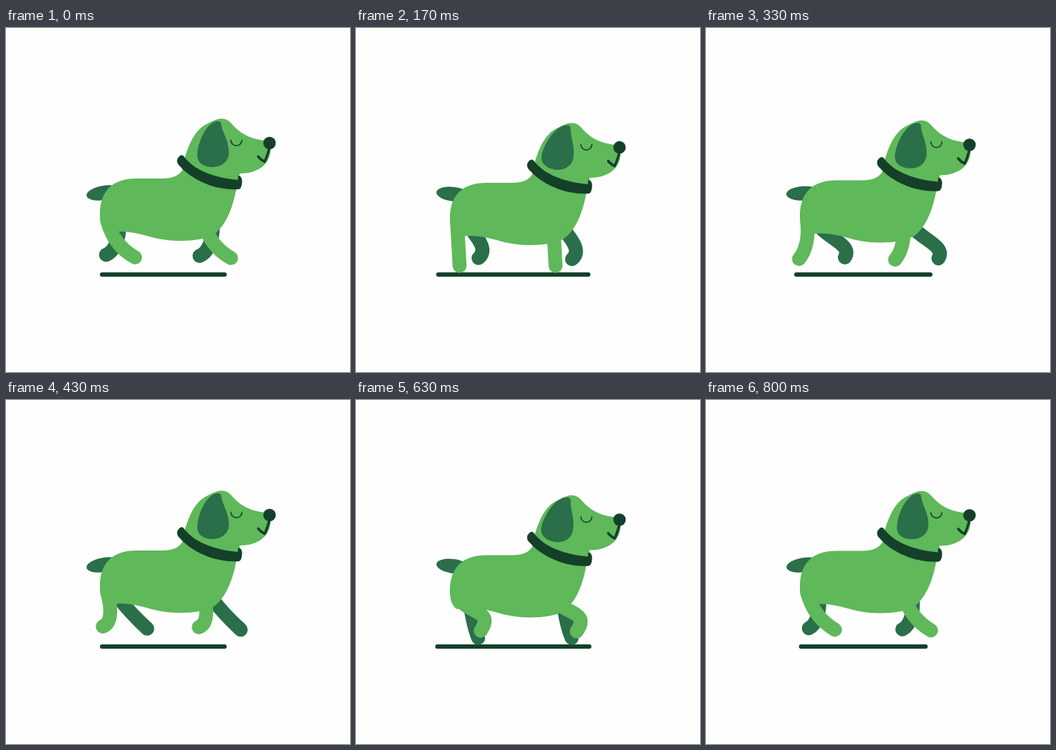
Write an HTML page with a canvas that moves like this. It is 480 px wide and 480 px high and loops after 0.83 s.

```html
<!DOCTYPE html>
<html lang="en">
<head>
<meta charset="utf-8">
<title>Walking dog</title>
<style>
  html, body { margin: 0; width: 100%; height: 100%; overflow: hidden; background: #fefefe; }
  canvas { display: block; width: 480px; height: 480px; }
</style>
</head>
<body>
<canvas id="stage"></canvas>
<script>
const LOOP = 830, STEPS = 25, STEP = 1000 / 30;
const LIGHT = '#5fb85a', SHADE = '#2a6e4a', DARK = '#14402a';

const canvas = document.getElementById('stage');
const ctx = canvas.getContext('2d');
const ratio = window.devicePixelRatio || 1;
canvas.width = canvas.height = 480 * ratio;

// Leg poses of a rear leg: two curve handles and the paw, at the steps in KEYS.
const KEYS = [0, 5, 8, 13, 16, 19, 24];
const NEAR = {
  hip: [141, 268], front: [134, 1], color: LIGHT,
  poses: [
    [147, 291, 160, 309, 180, 320],
    [142, 290, 143.5, 311, 144.5, 332],
    [141, 291, 138, 311, 131, 327],
    [149, 295, 146, 312, 135, 316],
    [145, 290, 178, 300, 160, 318],
    [146, 300, 196, 290, 174, 322],
    [147, 291, 160, 309, 180, 320.5]
  ]
};
const FAR = {
  hip: [158, 277], front: [130.5, 1.5], color: SHADE,
  poses: [
    [158, 293, 152, 312, 139.5, 316.5],
    [166, 290, 186, 308, 171, 321],
    [178, 298, 212, 304, 189, 321],
    [170, 293, 183, 306, 197, 319],
    [168, 299, 178, 321, 195, 323],
    [161, 300, 165, 318, 170.5, 332],
    [159, 294, 155, 313, 143.5, 318.5]
  ]
};

const HEAD = new Path2D(
  'M246 198C251 168 262 146 275 137C285 131 293 127 300 126.5C308 126 313 131 318 137' +
  'C330 150 346 156 364 157L369 168C370 184 358 203 326 203L324 218Z');
const BODY = new Path2D(
  'M250 192C243 205 236 210 216 210L185 210C150 209 131 226 131 260C131 272 134 280 140 285' +
  'L158 284C190 284 205 297 243 297C262 297 280 294 290 288C308 275 318 247 322 220Z');
const EAR = new Path2D(
  'M296 130C280 130 267 160 267 178C267 189 277 194 288 194C303 194 311 184 311 174' +
  'C311 156 301 145 300 133Q299 130 296 130Z');
const COLLAR = new Path2D(
  'M248.500 179.500C262 198 290 209 323.500 212L324 206Q329 206 329.500 214Q329 224 325 225' +
  'C298 227 262 216 240 190Q237 184 241 180Q245 175 248.500 179.500Z');
const MOUTH = new Path2D('M352 179.500Q356 184.500 361 186.500Q365 178 368 166');

const mod = (n, m) => ((n % m) + m) % m;

// Smooth periodic curve through the poses.
function poseAt(poses, step) {
  const n = KEYS.length;
  const time = i => KEYS[mod(i, n)] + STEPS * Math.floor(i / n);
  const value = (i, c) => poses[mod(i, n)][c];
  const slope = (i, c) => (value(i + 1, c) - value(i - 1, c)) / (time(i + 1) - time(i - 1));
  let k = n - 1;
  while (KEYS[k] > step) k--;
  const span = time(k + 1) - time(k);
  const u = (step - time(k)) / span, v = 1 - u;
  return poses[0].map((_, c) =>
    value(k, c) * (1 + 2 * u) * v * v + value(k + 1, c) * (3 - 2 * u) * u * u +
    span * u * v * (slope(k, c) * v - slope(k + 1, c) * u));
}

function stroke(color, width, path) {
  ctx.strokeStyle = color;
  ctx.lineWidth = width;
  path ? ctx.stroke(path) : ctx.stroke();
}

function fill(color, path) {
  ctx.fillStyle = color;
  path ? ctx.fill(path) : ctx.fill();
}

function drawLegs(legs, step) {
  const [ax, ay, bx, by, px, py] = poseAt(legs.poses, step);
  for (const [dx, dy] of [[0, 0], legs.front]) {
    ctx.beginPath();
    ctx.moveTo(legs.hip[0] + dx, legs.hip[1] + dy);
    ctx.bezierCurveTo(ax + dx, ay + dy, bx + dx, by + dy, px + dx, Math.min(py + dy, 332));
    stroke(legs.color, 19.5);
  }
}

// 0 at the top of the bounce, 1 at the bottom.
function bounce(step) {
  const marks = [0, 6, 13, 19, STEPS];
  let i = 0;
  while (step >= marks[i + 1]) i++;
  const u = (step - marks[i]) / (marks[i + 1] - marks[i]);
  const eased = (1 - Math.cos(Math.PI * u)) / 2;
  return i % 2 ? 1 - eased : eased;
}

function drawGround(low) {
  const half = 85.5 + 20.5 * low;
  ctx.beginPath();
  ctx.moveTo(219.5 - half, 344);
  ctx.lineTo(219.5 + half, 344);
  stroke(DARK, 6);
}

function drawTail(low) {
  ctx.beginPath();
  ctx.ellipse(136, 230 + 2 * low, 24, 10, (18 * low - 10) * Math.PI / 180, 0, 2 * Math.PI);
  fill(SHADE);
}

function drawEar(low) {
  ctx.save();
  ctx.translate(297, 131);
  ctx.rotate(low * 11 * Math.PI / 180);
  ctx.translate(-297, -131);
  fill(SHADE, EAR);
  ctx.restore();
}

function drawHead(low) {
  fill(LIGHT, HEAD);
  drawEar(low);
  ctx.beginPath();
  ctx.arc(321.5, 156.5, 7.7, 0, Math.PI);
  stroke(DARK, 1.6);
  stroke(DARK, 3.6, MOUTH);
  ctx.beginPath();
  ctx.arc(367.7, 160.5, 8.7, 0, 2 * Math.PI);
  fill(DARK);
  fill(DARK, COLLAR);
}

function draw(step) {
  const low = bounce(step);
  ctx.setTransform(ratio, 0, 0, ratio, 0, 0);
  ctx.fillStyle = '#fefefe';
  ctx.fillRect(0, 0, 480, 480);
  ctx.lineCap = ctx.lineJoin = 'round';

  drawGround(low);
  drawTail(low);
  drawLegs(FAR, step);
  ctx.save();
  ctx.translate(0, 6.5 * low);
  fill(LIGHT, BODY);
  ctx.restore();
  drawLegs(NEAR, step);
  ctx.translate(0, 6.5 * low);
  drawHead(low);
}

const start = performance.now();
function tick() {
  const t = (performance.now() - start) % LOOP;
  draw(Math.floor((t + 4) / STEP) % STEPS);
  requestAnimationFrame(tick);
}
tick();
</script>
</body>
</html>
```
